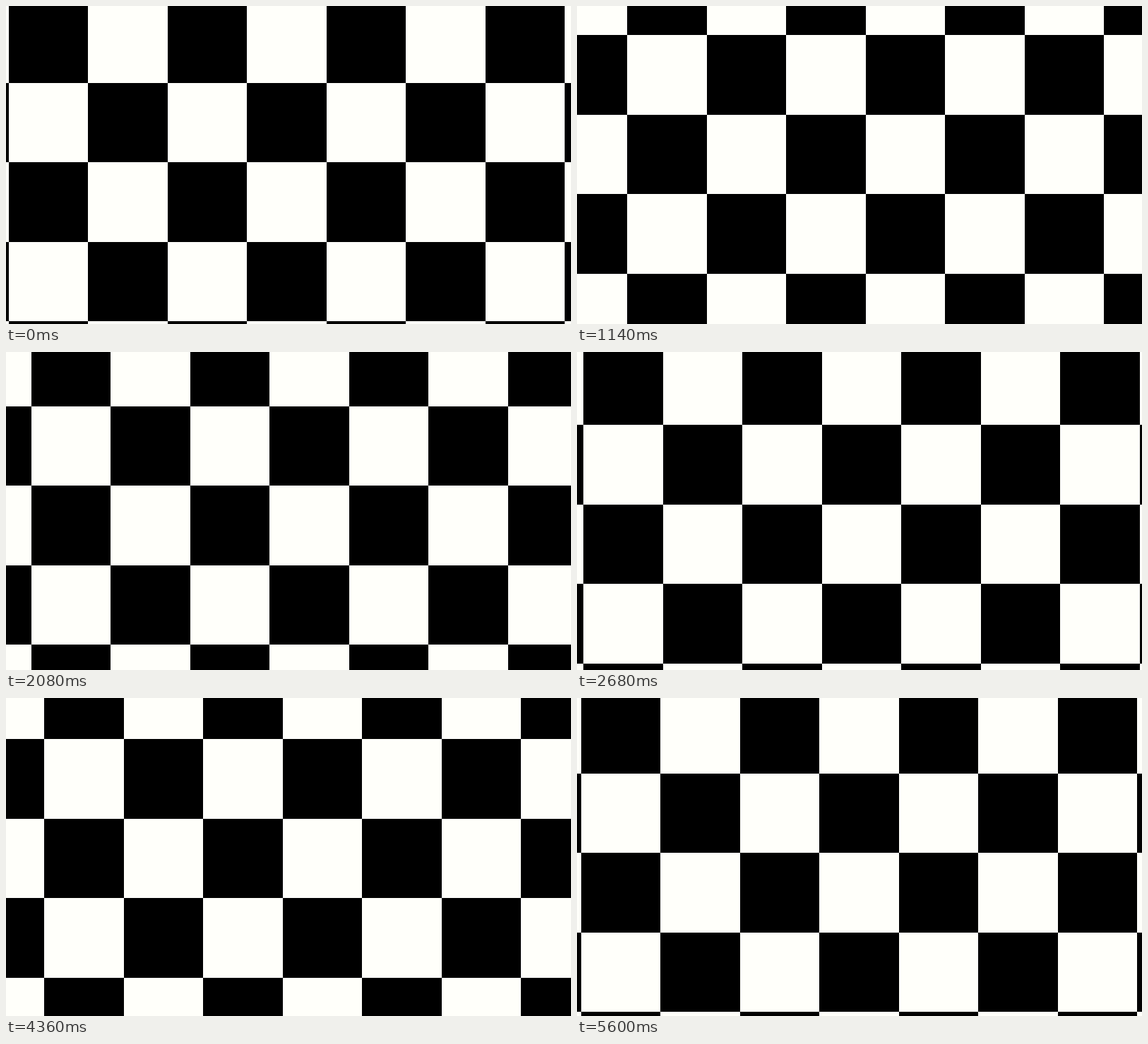
Animation of 800 by 450 pixels, one loop 5.7 s. Source, as an HTML page with a canvas:

```html
<!DOCTYPE html>
<html lang="en">
<head>
<meta charset="utf-8">
<title>Drifting checkerboard</title>
<style>
  html, body { margin: 0; width: 100%; height: 100%; overflow: hidden; background: #fffffa; }
  canvas { display: block; }
</style>
</head>
<body>
<canvas id="board" width="800" height="450"></canvas>
<script>
const ctx = document.getElementById('board').getContext('2d');
const CELL = 112.5, STEP = CELL / 60, COUNT = 121, LOOP = 5700;

// Uneven cadence: two short steps, then a long hold.
const isHold = i => i === COUNT - 1 || i % 3 === (i < 99 ? 1 : 2);
const ends = [];
for (let i = 0, t = 0; i < COUNT; i++) ends.push(t += isHold(i) ? 100 : 20);

// The board slides down-left; the first step only holds the pose.
const shiftAt = i => (2 * CELL + 3 * STEP - STEP * Math.max(i, 1)) % CELL;

function draw(shift) {
  const edgeX = c => Math.round(c * CELL + shift);
  const edgeY = r => Math.round(r * CELL - shift);
  ctx.fillStyle = '#fffffa';
  ctx.fillRect(0, 0, 800, 450);
  ctx.fillStyle = '#000';
  for (let r = 0; r < 5; r++) {
    for (let c = -1; c < 8; c++) {
      if ((c + r) % 2) continue;
      const x = edgeX(c), y = edgeY(r);
      ctx.fillRect(x, y, edgeX(c + 1) - x, edgeY(r + 1) - y);
    }
  }
}

function tick() {
  const t = performance.now() % LOOP;
  draw(shiftAt(ends.findIndex(end => t < end)));
  requestAnimationFrame(tick);
}
tick();
</script>
</body>
</html>
```
